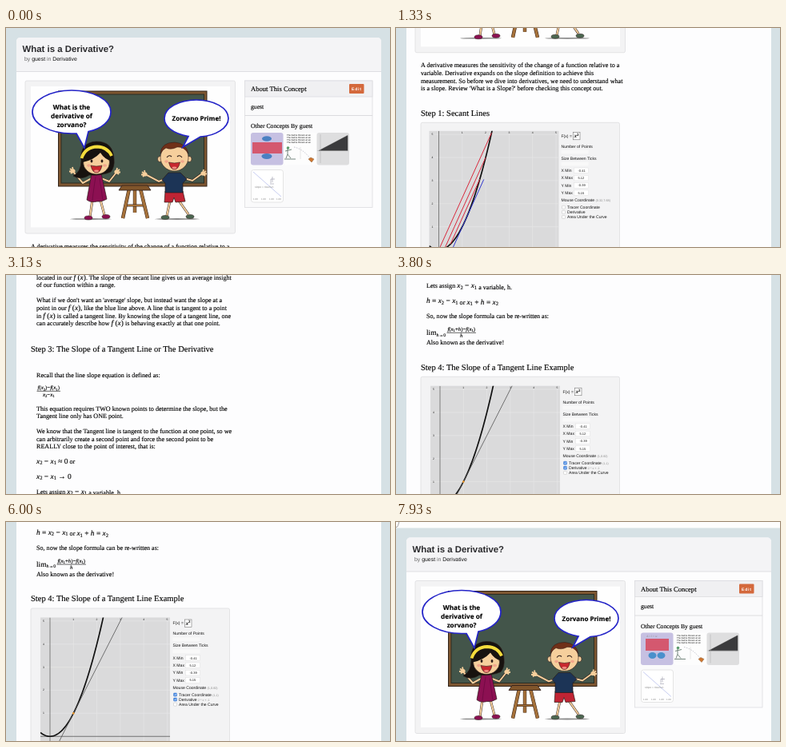
These frames come from a looping animation (480x274 px, 8000 ms). An HTML page:

```html
<!DOCTYPE html>
<html lang="en">
<head>
<meta charset="utf-8">
<title>What is a Derivative?</title>
<style>
  html, body { margin: 0; width: 100%; height: 100%; overflow: hidden; background: #d6e1e5; }
  svg { display: block; width: 480px; height: 274px; }
  text { font-family: "Liberation Serif", serif; fill: #000; stroke: #000; stroke-width: .14px;
    text-rendering: geometricPrecision; white-space: pre; }
  .sans { font-family: "Liberation Sans", sans-serif; stroke: none; fill: #111; }
  .speech { font-family: "Noto Sans", sans-serif; font-weight: 700; text-anchor: middle; }
  .bold { font-weight: 700; }
  .title { fill: #2b2b2e; }
  .pale { fill: #888; stroke: none; }
  .mid { text-anchor: middle; }
</style>
</head>
<body>
<svg viewBox="0 0 480 274"><g id="page"></g></svg>
<script>
const LOOP = 8000, STEP = LOOP / 120, LINE = 9.6;
const BODY = 8.1, HEAD = 10.5, MATH = 9.4;

// --- drawing helpers -------------------------------------------------
const rect = (x, y, w, h, fill, extra = '') =>
  `<rect x="${x}" y="${y}" width="${w}" height="${h}" fill="${fill}" ${extra}/>`;
const path = (d, stroke, width = 1, fill = 'none', extra = '') =>
  `<path d="${d}" stroke="${stroke}" stroke-width="${width}" fill="${fill}" ${extra}/>`;
const oval = (x, y, rx, ry, fill, extra = '') =>
  `<ellipse cx="${x}" cy="${y}" rx="${rx}" ry="${ry}" fill="${fill}" ${extra}/>`;
const edge = (color, width = .8) => `stroke="${color}" stroke-width="${width}"`;

// "_c" is a subscript, "^c" a superscript; f, x and h are set in italics.
function math(source, size) {
  let level = 0;
  return source.replace(/([_^]?)(.)/g, (all, mark, char) => {
    const target = mark === '_' ? size * .18 : mark === '^' ? -size * .36 : 0;
    const dy = target - level;
    level = target;
    const style = /[fxh]/.test(char) ? 'italic' : 'normal';
    return `<tspan dy="${dy}" font-size="${mark ? size * .7 : size}" font-style="${style}">${char}</tspan>`;
  });
}

// Formulas inside running text stand between dollar signs.
const text = (x, y, size, content, cls = '') =>
  `<text x="${x}" y="${y}" font-size="${size}" class="${cls}">` +
  content.replace(/\$(.+?)\$/g, (all, formula) => math(formula, MATH)) + '</text>';
const lines = (x, y, list) =>
  list.map((line, i) => text(x, y + i * LINE, BODY, line)).join('');

function fraction(x, y, width, top, bottom) {
  const size = 6.8, center = x + width / 2;
  return text(center, y - 2, size, math(top, size), 'mid') +
    text(center, y + 6.2, size, math(bottom, size), 'mid') +
    path(`M${x} ${y}h${width}`, '#222', .7);
}
function limit(x, y) {
  return text(x, y + 2.8, MATH, 'lim') + text(x + 12.6, y + 4.3, 5.7, math('h→0', 5.7));
}
function equalsLimit(y) {
  return text(38, y + 2.8, MATH, '=') + limit(47, y);
}

// --- page header and cards -------------------------------------------
const card = (x, y, w, h) => rect(x, y, w, h, '#f3f3f4', 'rx="2" ' + edge('#dedee0', .8));

function header() {
  return rect(0, -60, 480, 60, '#fdfdfd') + path('M4 -8L2.5 -3Q2 -1 0 -1', '#999', .9) +
    rect(13, 12, 456, 1900, '#fdfdfe', 'rx="5"') +
    path('M13 54.5V17q0-5 5-5H464q5 0 5 5V54.5z', 'none', 0, '#f4f4f6') +
    path('M13 54.5H469', '#dcdce0', .9) +
    text(20.5, 30.3, 11.4, 'What is a Derivative?', 'sans bold title') +
    text(23, 41, 6.9, '<tspan fill="#666">by</tspan> guest <tspan fill="#666">in</tspan> Derivative', 'sans');
}

function sidebar() {
  const thumb = (x, y, fill) => rect(x, y, 40.5, 40.5, fill, 'rx="3"');
  return rect(298.5, 66, 159.5, 158.5, '#fafafb', edge('#dddde0')) +
    rect(298.5, 66, 159.5, 20, '#f0f0f2', edge('#dddde0')) +
    path('M298.5 109.5h159.5', '#d8d8dc', .9) +
    text(306, 79, 8.6, 'About This Concept') +
    rect(429, 70, 18.5, 12, '#d4693c', 'rx="1"') +
    `<text x="432" y="78" font-size="5" letter-spacing=".8" class="sans bold" style="fill:#fff">Edit</text>` +
    text(306, 100.5, 7.7, 'guest') + text(306, 125, 7.7, 'Other Concepts By guest') +
    thumb(306, 131, '#c6c0e2') +
    '<g id="thumbA">' + oval(326, 138.5, 6, 3.2, '#4a80c2') + rect(308, 143, 37, 14, '#d4586f') +
      oval(326, 160.5, 6.5, 3.4, '#4a80c2') + '</g>' +
    '<g id="thumbB">' + text(313, 136, 3.6, 'A = l × w', 'pale') + rect(312, 138.5, 29, 15, '#d4586f') +
      oval(320.5, 159.5, 5, 4, '#4a90cc') + oval(331.5, 159.5, 5, 4, '#4a90cc') + '</g>' +
    thumb(347.5, 131, '#fdfdfd') +
    [0, 1, 2, 3].map(i => text(351, 135 + i * 3, 2.9, 'The ball is thrown at an', 'sans')).join('') +
    path('M352 151v7l-2 5m2-5l4 5M349 154l8-2M348 164H362', '#667a70', .9) + oval(352.5, 150, 1.8, 1.8, '#5a9a6c') +
    path('M360 149Q371 151 381 164', '#99a', .6, 'none', 'stroke-dasharray="1.5 1.5"') +
    path('M368 149v15', '#ccc', .5) + path('M378 164l3-2 4 2-3 4z', '#864', .5, '#d0762f') +
    thumb(388.5, 131, '#dededf') + path('M391 153.5L427 134.5V153.5z', '#333', .5, '#3b3b3d') +
    path('M393 133V169M389 153.5H428', '#aaa', .5) +
    rect(306.5, 177.5, 40, 40.5, '#fff', 'rx="3" ' + edge('#ddd')) +
    path('M309 180L344 211', '#b9c0ee', .8) + path('M331 194v-5h5m-3-3v7m-3 2h5', '#99a', .6) +
    text(311, 200, 3.4, 'slope = rise/run', 'sans pale') +
    [309, 319, 329, 338].map(x => text(x, 215, 3, '1.00', 'sans pale')).join('');
}

// --- classroom picture -----------------------------------------------
function classroom() {
  const skin = '#f6cf9c', ink = '#2a1a18', plum = '#8c1052';
  const limb = (d, color = skin, width = 2) => path(d, ink, width + .9) + path(d, color, width);
  const hand = (x, y, side) => path(`M${x} ${y}l${side * 4}-3M${x} ${y}l${side * 5} .5M${x} ${y}l${side}-5M${x} ${y}l${side * 3} 3`, skin, 1.8) +
    oval(x, y, 2.6, 2.6, skin);
  const foot = (x, y, color) => oval(x, y, 5, 2.5, color, edge(ink, .5));
  const shadow = (x, y, rx) => oval(x, y, rx, .9, '#8a8a8a');
  const cheeks = (x, y) => oval(x - 10, y + 4, 2.4, 1.8, '#f2a68c') + oval(x + 10, y + 4, 2.4, 1.8, '#f2a68c');
  const mouth = (x, y) => path(`M${x - 7} ${y}Q${x} ${y + 2} ${x + 7} ${y}Q${x + 5} ${y + 9} ${x} ${y + 9}Q${x - 5} ${y + 9} ${x - 7} ${y}z`, ink, .6, '#c8282f') +
    oval(x, y + 7, 3, 1.4, '#f08a80');
  const bubble = d => path(d, '#2424c8', 1.7, '#fff');

  const board = rect(65.5, 79, 185.5, 119, '#7d5631', edge('#33241a', 1)) +
    rect(69, 83, 178.5, 111, '#43554a', edge('#2c2c22', 1));
  const easel = limb('M161 200V231', '#a5713a', 3.5) + limb('M149 222H173', '#a5713a') +
    limb('M154 201L146 238', '#a5713a', 3.5) + limb('M168 201L177 238', '#a5713a', 3.5) +
    path('M145 197H177L181 203H141z', ink, .8, '#80552b');

  const girl = shadow(106, 239, 26) + limb('M108 215L105 236') + limb('M118 215L123 234') +
    foot(103, 237.5, plum) + foot(125, 236, plum) +
    limb('M107 188L96 194L85 181') + limb('M119 188L129 192L137 182') + hand(84, 179, -1) + hand(138, 180, 1) +
    path('M107 182H119L126 214Q120 218 114 217Q106 219 101 215z', ink, .7, plum) +
    path('M112 186Q109 205 108 216M117 188L121 215', '#6c0a40', .8) +
    path('M94 166Q92 143 113 142Q134 142 135 164Q136 174 131 180Q120 185 104 184Q94 191 84 185Q94 180 94 166z', ink, .6, '#17120f') +
    oval(113, 168, 16.5, 15, skin, edge(ink, .6)) +
    path('M96 168Q96 149 113 149Q131 149 131 166Q123 164 118 156Q110 165 96 168z', 'none', 0, '#17120f') +
    path('M94.5 163Q99 149 114 148.5Q127 149 132 160', '#f4dc3c', 3.8) +
    oval(107, 166.5, 1.4, 2, ink) + oval(120, 166.5, 1.4, 2, ink) + cheeks(113.5, 168) + mouth(113, 172);

  const boy = shadow(214, 239, 28) + limb('M205 216L201 235') + limb('M216 216L228 233') +
    foot(199, 237, '#4b6650') + foot(230, 236, '#4b6650') +
    limb('M204 187L191 192L176 184') + limb('M219 187L233 191L244 183') + hand(174, 183, -1) + hand(246, 182, 1) +
    path('M199 204H221L224 217L212 218L210 212L208 218H198z', ink, .7, '#c02434') +
    path('M203 181H218L226 189L221 194V206H199V194L195 190z', ink, .7, '#1c3456') +
    oval(192.5, 164, 3, 3.6, skin, edge(ink, .6)) + oval(229, 164, 3, 3.6, skin, edge(ink, .6)) +
    oval(210.5, 162, 17.5, 17, skin, edge(ink, .6)) +
    path('M193 157Q194 143 211 143Q225 144 228 157Q222 148 214 149Q206 153 200 150Q196 152 193 157z', ink, .5, '#703018') +
    path('M201 162Q204 158 207 161M214 161Q217 158 220 162', ink, 1.1) +
    cheeks(210.5, 163) + mouth(210.5, 168);

  return card(24, 66, 262.5, 191) + rect(31, 73, 249, 176.5, '#fefefe') + board + easel + girl + boy +
    bubble('M88 132L98 150L103 129.5C120 126 131 116 131 105C131 90 109 78 82 78S33 90 33 105S55 132 82 132z') +
    bubble('M228 135.5L221 149L243 136C262 135 278 125 278 113C278 100 260 90 238 90S198 100 198 113C198 123 208 132 228 135.5z') +
    ['What is the', 'derivative of', 'zorvano?'].map((line, i) => text(82, 102 + i * 11, 8.2, line, 'speech')).join('') +
    text(238, 116, 8, 'Zorvano Prime!', 'speech');
}

// --- interactive graphs ----------------------------------------------
const X_MIN = -.41, X_MAX = 5.12, Y_MIN = -.39, Y_MAX = 5.15;

function graph(left, top, id, drawExtras) {
  const width = 162, height = 160;
  const px = x => left + (x - X_MIN) / (X_MAX - X_MIN) * width;
  const py = y => top + (Y_MAX - y) / (Y_MAX - Y_MIN) * height;
  const segment = (x1, y1, x2, y2, color, w) =>
    path(`M${px(x1)} ${py(y1)}L${px(x2)} ${py(y2)}`, color, w);
  let grid = '', curve = '';
  for (let n = 1; n <= 5; n++) {
    grid += segment(n, Y_MIN, n, Y_MAX, '#e6e6e7', .7) + segment(X_MIN, n, X_MAX, n, '#e6e6e7', .7) +
      text(px(n) - 1, top + 3.6, 3.4, String(n), 'sans') + text(left + 3, py(n) + 1, 3.4, String(n), 'sans');
  }
  for (let x = X_MIN; x < 2.4; x += .05) curve += (curve ? 'L' : 'M') + px(x) + ' ' + py(x * x);
  return `<clipPath id="${id}">${rect(left, top, width, height, '#000')}</clipPath>` +
    rect(left, top, width, height, '#dadadb') + `<g clip-path="url(#${id})">` + grid +
    segment(0, Y_MIN, 0, Y_MAX, '#555', .7) + segment(X_MIN, 0, X_MAX, 0, '#555', .8) +
    path(curve, '#111', 1.7) + drawExtras(segment, px, py) + '</g>';
}

function controls(x, y, mouse, tracer, derivative) {
  const label = (dy, content) => text(x, y + dy + 1.8, 5.1, content, 'sans');
  const field = (dx, dy, w) => rect(x + dx, y + dy - 3.3, w, 6.6, '#fff', edge('#e0e0e0', .5));
  const ranges = [['X Min', '-0.41'], ['X Max', '5.12'], ['Y Min', '-0.39'], ['Y Max', '5.15']];
  const checks = [['Tracer Coordinate', tracer], ['Derivative', derivative], ['Area Under the Curve', '']];
  return label(0, 'F(x) =') + rect(x + 15, y - 4.5, 8.5, 9.5, '#fff', edge('#777', .6)) +
    text(x + 16.3, y + 2.5, 6, math('x^2', 7)) +
    label(13, 'Number of Points') + rect(x, y + 18, 34, 4.5, '#f9f9f9') +
    label(28, 'Size Between Ticks') + rect(x, y + 33, 34, 4.5, '#f9f9f9') +
    ranges.map(([name, value], i) => label(43.5 + i * 9.3, name) + field(16, 43.5 + i * 9.3, 18) +
      text(x + 21, y + 45 + i * 9.3, 4, value, 'sans')).join('') +
    label(80.5, `Mouse Coordinate <tspan font-size="3.8" fill="#888">${mouse}</tspan>`) +
    checks.map(([name, value], i) => {
      const dy = 89.5 + i * 6.1;
      return rect(x + 1, y + dy - 2, 4, 4, value ? '#4f8fe6' : '#fff', 'rx=".8" ' + edge(value ? '#3a74c8' : '#bbb', .5)) +
        (value ? path(`M${x + 2} ${y + dy}l1 1 1.4-2`, '#fff', .6) : '') +
        text(x + 7.5, y + dy + 1.8, 5.1, `${name} <tspan font-size="3.6" fill="#888">${value}</tspan>`, 'sans');
    }).join('');
}

const secants = segment =>
  [0, .25, .5].map(a => {
    const b = 2.25 - a;
    return segment(a, a * a, b, b * b, '#d8283c', 1);
  }).join('') + segment(.53, -.07, 1.92, 3.05, '#3038d0', 1);

const tangent = (segment, px, py) =>
  segment(0, -1, 3.2, 5.4, '#555', .8) + oval(px(1), py(1), 1.3, 1.3, '#f09a2c');

// --- article ---------------------------------------------------------
function article() {
  const slope = y => fraction(38.5, y, 29.5, 'f(x_2)−f(x_1)', 'x_2−x_1');
  const derivative = y => limit(38, y) + fraction(63.5, y, 36.5, 'f(x_1+h)−f(x_1)', 'h');
  const steps = [
    [1379, 30, 'f(1+h)−f(x)'], [1403, 28, '(1+h)^2−(1)'], [1427, 35, '1+2h+h^2−(1)'],
    [1450, 16, '2h+h^2'], [1473, 18, 'h(2+h)']
  ];
  return lines(31, 275.6, [
      'A derivative measures the sensitivity of the change of a function relative to a',
      'variable. Derivative expands on the slope definition to achieve this',
      'measurement. So before we dive into derivatives, we need to understand what',
      "is a slope. Review 'What is a Slope?' before checking this concept out."]) +
    text(31, 336, HEAD, 'Step 1: Secant Lines') +
    card(31, 344.5, 248.5, 186) + graph(41.5, 355, 'plotOne', secants) +
    controls(206.5, 361, '(0.32,7.68)', '', '') +
    lines(38, 558.7, [
      'The red lines shown in the graph above are known as Secant Lines. A',
      'secant line connects two points in a function. We can determine the slope',
      'of these secant lines by plugging the two end points to:']) +
    slope(596) +
    lines(38, 619.6, [
      'The slope of a secant line gives us some insight about the function. For',
      'example, the three red secant lines have positive slopes, indicating that the',
      'function in that range on average is increasing.']) +
    text(31, 672.5, HEAD, 'Step 2: Tangent Lines') +
    lines(38, 704.2, [
      'A secant line needs two points, so its slope only tells us how',
      'the function changes between them. When the two points move',
      'closer together, the secant line follows the curve more closely.',
      'Both end points of every secant line in the graph above are',
      'located in our $f (x)$. The slope of the secant line gives us an average insight',
      'of our function within a range.']) +
    lines(38, 771.4, [
      "What if we don't want an 'average' slope, but instead want the slope at a",
      'point in our $f (x)$, like the blue line above. A line that is tangent to a point',
      'in $f (x)$ is called a tangent line. By knowing the slope of a tangent line, one',
      'can accurately describe how $f (x)$ is behaving exactly at that one point.']) +
    text(31, 833.3, HEAD, 'Step 3: The Slope of a Tangent Line or The Derivative') +
    text(38, 864.5, BODY, 'Recall that the line slope equation is defined as:') +
    slope(882.3) +
    lines(38, 906.6, [
      'This equation requires TWO known points to determine the slope, but the',
      'Tangent line only has ONE point.']) +
    lines(38, 935, [
      'We know that the Tangent line is tangent to the function at one point, so we',
      'can arbitrarily create a second point and force the second point to be',
      'REALLY close to the point of interest, that is:']) +
    text(38, 972.8, BODY, '$x_2 − x_1 ≈ 0$ or') +
    text(38, 991.8, BODY, '$x_2 − x_1 → 0$') +
    text(38, 1010.7, BODY, 'Lets assign $x_2 − x_1$ a variable, h.') +
    text(38, 1029.8, BODY, '$h = x_2 − x_1$ or $x_1 + h = x_2$') +
    text(38, 1048.7, BODY, 'So, now the slope formula can be re-written as:') +
    derivative(1067) +
    text(38, 1081.5, BODY, 'Also known as the derivative!') +
    text(31, 1113.3, HEAD, 'Step 4: The Slope of a Tangent Line Example') +
    card(31, 1122, 248.5, 186) + graph(43, 1133.5, 'plotFour', tangent) +
    controls(208.5, 1140.5, '(1,0.82)', '(1,1)', '2 * x + -1') +
    text(38, 1337.5, BODY, 'Lets find the slope of a line tangent to (1,1) of the function $f (x) = x^2$') +
    derivative(1356) +
    steps.map(([y, width, top]) => equalsLimit(y) + fraction(72.5, y, width, top, 'h')).join('') +
    equalsLimit(1493) + text(72, 1495.8, MATH, math('(2 + h)', MATH)) +
    text(38, 1515, MATH, '= 2') +
    card(31, 1537, 259, 200) + rect(37, 1543, 248, 190, '#fff', edge('#e2e2e4', .6));
}

const page = document.getElementById('page');
page.innerHTML = header() + classroom() + sidebar() + article();
const thumbA = document.getElementById('thumbA'), thumbB = document.getElementById('thumbB');

// --- scrolling: [step, offset], joined by a monotone cubic ------------
const stops = [[0, 0], [13, 123], [28, 368], [47, 737], [69, 1275], [77, 1368], [78, 1368],
  [90, 1014], [104, 120], [108, 0], [111, -12], [117, -8], [118, -7.5], [120, -7.5]];
const rates = stops.slice(1).map(([k, y], i) => (y - stops[i][1]) / (k - stops[i][0]));
const slopes = stops.map((stop, i) => {
  const before = rates[i - 1], after = rates[i];
  return before * after > 0 ? 2 * before * after / (before + after) : 0;
});
slopes[0] = 4;

function scrollAt(step) {
  const i = stops.findLastIndex(([k]) => k <= step);
  const [k0, y0] = stops[i], [k1, y1] = stops[i + 1];
  const span = k1 - k0, u = (step - k0) / span, v = 1 - u;
  return y0 * v * v * (1 + 2 * u) + y1 * u * u * (3 - 2 * u) +
    span * u * v * (slopes[i] * v - slopes[i + 1] * u);
}

function draw() {
  const time = performance.now() % LOOP;
  const step = Math.min(119, Math.floor((time + 4) / STEP));
  page.setAttribute('transform', `translate(0 ${-scrollAt(step).toFixed(2)})`);
  const later = step > 60;
  thumbA.style.display = later ? 'none' : '';
  thumbB.style.display = later ? '' : 'none';
  requestAnimationFrame(draw);
}
draw();
</script>
</body>
</html>
```
